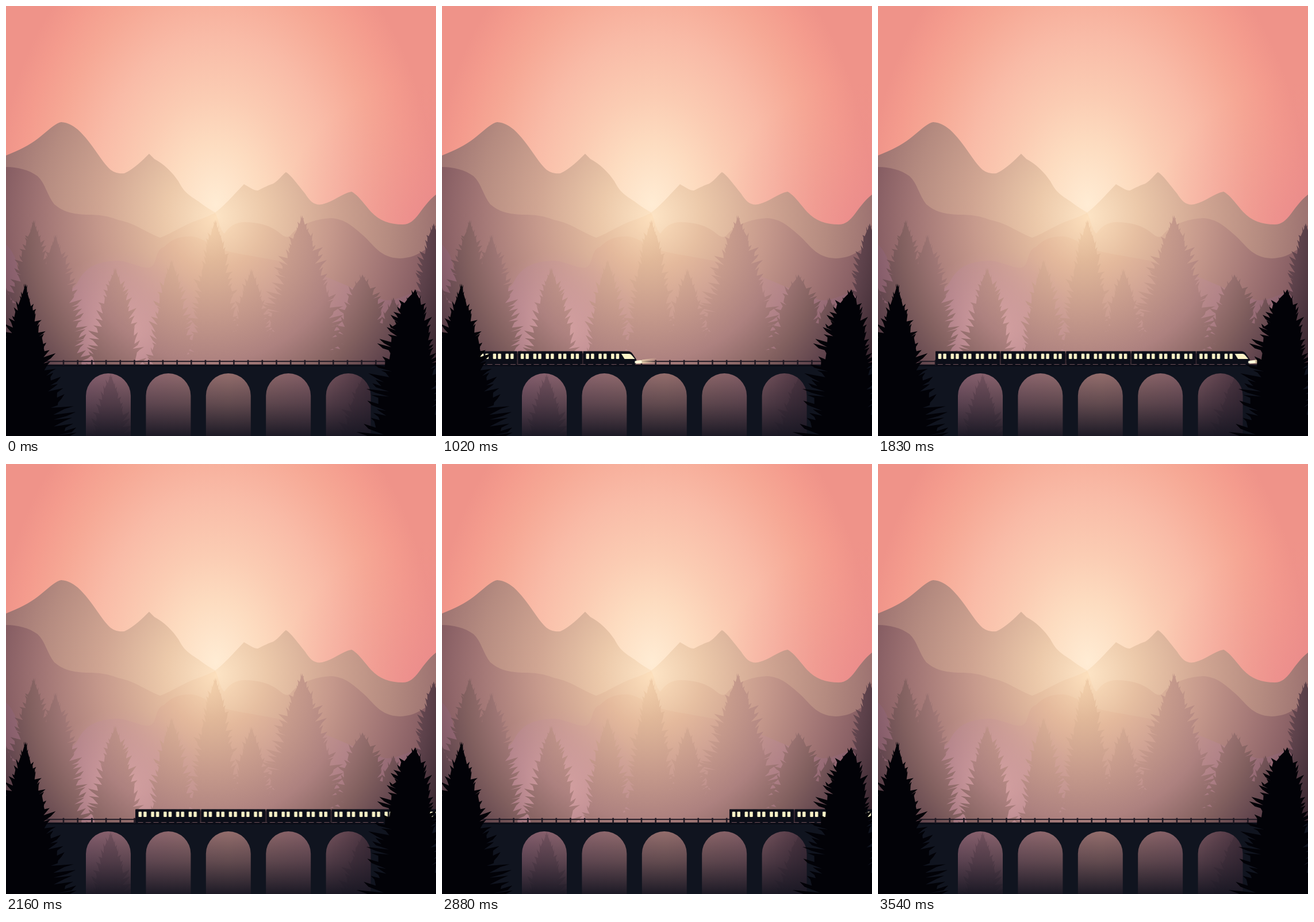
Animation, 748 px wide and 748 px high, one loop 4.38 s. Source, as an HTML page:

```html
<!DOCTYPE html>
<html lang="en">
<head>
<meta charset="utf-8">
<title>Evening train</title>
<style>
  html, body { margin: 0; width: 100%; height: 100%; overflow: hidden; background: #ef9389; }
  svg { display: block; width: 100vw; height: 100vh; }
  #train { animation: ride 4380ms steps(146) infinite; }
  @keyframes ride {
    from { transform: translateX(-597.5px); }
    to { transform: translateX(1071.3px); }
  }
</style>
</head>
<body>
<svg viewBox="0 0 748 748">
  <defs>
    <radialGradient id="sky" gradientUnits="userSpaceOnUse" cx="0" cy="0" r="1" gradientTransform="translate(365 345) scale(380 520)">
      <stop offset="0" stop-color="#ffecd4"/>
      <stop offset=".2" stop-color="#fddcc0"/>
      <stop offset=".36" stop-color="#fbccb3"/>
      <stop offset=".56" stop-color="#f9bba7"/>
      <stop offset=".76" stop-color="#f6a895"/>
      <stop offset=".9" stop-color="#f49b8d"/>
      <stop offset="1" stop-color="#ef9389"/>
    </radialGradient>
    <radialGradient id="blush" gradientUnits="userSpaceOnUse" cx="740" cy="400" r="270">
      <stop offset="0" stop-color="#e4828c" stop-opacity=".6"/>
      <stop offset="1" stop-color="#ec8c8c" stop-opacity="0"/>
    </radialGradient>
    <radialGradient id="far" gradientUnits="userSpaceOnUse" cx="365" cy="365" r="400">
      <stop offset="0" stop-color="#fde4c5"/>
      <stop offset=".22" stop-color="#ecc9aa"/>
      <stop offset=".5" stop-color="#d0a592"/>
      <stop offset=".76" stop-color="#b58b80"/>
      <stop offset="1" stop-color="#986e6e"/>
    </radialGradient>
    <radialGradient id="mid" gradientUnits="userSpaceOnUse" cx="365" cy="368" r="400">
      <stop offset="0" stop-color="#fde0bd"/>
      <stop offset=".22" stop-color="#e6bfa1"/>
      <stop offset=".5" stop-color="#c6998c"/>
      <stop offset=".75" stop-color="#a27675"/>
      <stop offset="1" stop-color="#7c545c"/>
    </radialGradient>
    <radialGradient id="near" gradientUnits="userSpaceOnUse" cx="365" cy="370" r="400">
      <stop offset="0" stop-color="#fbdcb6"/>
      <stop offset=".22" stop-color="#e4b99c"/>
      <stop offset=".45" stop-color="#c99b91"/>
      <stop offset=".68" stop-color="#b08187"/>
      <stop offset="1" stop-color="#7d5564"/>
    </radialGradient>
    <radialGradient id="mist" gradientUnits="userSpaceOnUse" cx="205" cy="565" r="140">
      <stop offset="0" stop-color="#dba6a6" stop-opacity=".85"/>
      <stop offset="1" stop-color="#cf9aa4" stop-opacity="0"/>
    </radialGradient>
    <radialGradient id="wood" gradientUnits="userSpaceOnUse" cx="355" cy="385" r="450">
      <stop offset="0" stop-color="#f3d0ab"/>
      <stop offset=".13" stop-color="#e1b899"/>
      <stop offset=".33" stop-color="#c79b8c"/>
      <stop offset=".52" stop-color="#ad817f"/>
      <stop offset=".7" stop-color="#82605f"/>
      <stop offset=".84" stop-color="#5f434c"/>
      <stop offset="1" stop-color="#38262f"/>
    </radialGradient>
    <linearGradient id="ground" gradientUnits="userSpaceOnUse" x1="139" x2="635" y1="0" y2="0">
      <stop offset="0" stop-color="#88606f"/>
      <stop offset=".5" stop-color="#97706e"/>
      <stop offset=".8" stop-color="#845e66"/>
      <stop offset="1" stop-color="#4a3340"/>
    </linearGradient>
    <linearGradient id="dusk" gradientUnits="userSpaceOnUse" x1="0" x2="0" y1="635" y2="748">
      <stop offset="0" stop-color="#191724" stop-opacity="0"/>
      <stop offset=".5" stop-color="#191724" stop-opacity=".42"/>
      <stop offset="1" stop-color="#171622" stop-opacity=".95"/>
    </linearGradient>
    <linearGradient id="beam">
      <stop offset="0" stop-color="#fff8d2"/>
      <stop offset=".35" stop-color="#f6e3b8" stop-opacity=".75"/>
      <stop offset="1" stop-color="#e6c3a0" stop-opacity=".1"/>
    </linearGradient>
  </defs>

  <rect width="748" height="748" fill="url(#sky)"/>
  <rect width="748" height="748" fill="url(#blush)"/>

  <path fill="url(#far)" d="M0 260C25 250 45 240 60 227C78 212 88 203 96 202C108 203 115 207 125 215C150 238 165 270 182 285C190 291 200 292 206 291C222 284 238 268 249 257L258 266C275 275 290 290 300 305C310 325 320 330 335 340C345 348 358 356 364 359C375 352 395 330 414 310L421 314C428 318 432 321 438 321C448 316 458 311 465 309C475 303 480 294 487 289C497 295 508 312 520 326C530 342 538 347 550 345C570 340 585 326 601 323C612 328 625 347 635 358C650 374 668 380 690 380C715 380 720 350 748 328V748H0Z"/>
  <path fill="url(#mid)" d="M0 280C20 280 40 285 55 296C68 308 72 330 84 345C100 358 115 362 140 363C165 363 175 365 195 372C225 378 240 392 268 403C290 395 310 380 335 372C350 367 358 362 364 360C370 370 372 390 380 396C388 384 398 376 415 376C440 376 460 382 475 394C484 402 490 404 495 399C505 385 530 371 565 369C590 370 605 385 620 398C640 415 650 438 685 439C715 438 725 425 748 412V748H0Z"/>
  <path fill="url(#near)" d="M0 415C8 422 14 432 18 445C22 475 40 500 70 500C100 500 115 498 125 480C140 450 165 444 195 443C215 444 235 457 250 455C264 450 258 424 275 419C290 404 305 400 325 401C345 404 360 420 380 425C400 432 470 440 500 450C560 470 620 500 660 512C690 512 720 490 748 480V748H0Z"/>
  <rect y="400" width="400" height="240" fill="url(#mist)"/>
  <g id="forest" fill="url(#wood)"></g>

  <rect y="625" width="748" height="123" fill="url(#ground)"/>
  <g id="under" fill="#2a1e2c" opacity=".2"></g>
  <rect y="625" width="748" height="123" fill="url(#dusk)"/>
  <path id="bridge" fill="#10141f" fill-rule="evenodd"/>
  <path fill="#0b0d17" d="M0 624H748V627H0Z"/>
  <g stroke="#211a24">
    <path d="M60 618.3H690" stroke-width="2"/>
    <path d="M60 623.3H690" stroke-width="1" stroke-opacity=".5"/>
    <path d="M98.7 620.2H690" stroke-width="9" stroke-dasharray="2.6 22.1"/>
  </g>

  <g id="train">
    <g id="cars"></g>
    <g transform="translate(454.4)">
      <path fill="#0c0e18" d="M0 600.5H78Q83 600.5 86 605L92 614Q94 618 92 622L90 624H0Z"/>
      <path fill="#fdf4c8" d="M66.5 605H80Q83 605 85 608L90 614H72Z"/>
      <path fill="url(#beam)" d="M92 617L127 612V621L92 622Z"/>
      <path fill="#fff9dc" d="M90 617.5L102 616.5V621L90 621.5Z"/>
    </g>
    <g id="windows" fill="#fdf4c8"></g>
    <path d="M4 623.5H540" stroke="#6d5058" stroke-width="1" stroke-dasharray="9 4.5"/>
  </g>

  <g id="front" fill="#020207"></g>
</svg>

<script>
  const NS = 'http://www.w3.org/2000/svg';
  const $ = id => document.getElementById(id);

  function add(id, tag, attrs) {
    const el = document.createElementNS(NS, tag);
    for (const key in attrs) el.setAttribute(key, attrs[key]);
    $(id).append(el);
  }

  let seed = 11;
  const rand = () => (seed = (seed * 16807) % 2147483647) / 2147483647;

  // One side of a conifer, from the thin leader to the base.
  function side(x, top, base, half, pow, dir) {
    const pts = [];
    let step = 6;
    for (let y = top + step; y < base; y += step) {
      const depth = y - top;
      const w = half * (depth / (base - top)) ** pow * (1 - Math.exp(-depth / 16));
      const out = Math.max(3, w * (0.78 + 0.42 * rand()));
      const inner = Math.max(1.2, w * (0.58 + 0.24 * rand()));
      const lift = 2 + 5 * rand();
      pts.push([x + dir * inner, y]);
      pts.push([x + dir * out, y - lift]);
      pts.push([x + dir * (inner + (out - inner) * 0.6), y + 2]);
      step = 6 + 7 * rand();
    }
    pts.push([x + dir * half, base]);
    return pts;
  }

  function tree(id, x, top, base, left, pow, right = left) {
    const pts = [[x, top],
      ...side(x, top, base, right, pow, 1),
      ...side(x, top, base, left, pow, -1).reverse()];
    add(id, 'path', { d: 'M' + pts.map(p => p.map(v => v.toFixed(1)).join(' ')).join('L') + 'Z' });
  }

  [
    [0, 490, 46, 0.5], [48, 372, 72, 0.7], [86, 398, 62, 0.62],
    [190, 455, 54, 0.62], [288, 441, 48, 0.6], [364, 372, 58, 0.6],
    [427, 457, 50, 0.6], [515, 364, 92, 0.72], [620, 467, 62, 0.45],
    [674, 507, 50, 0.5], [744, 378, 54, 0.55]
  ].forEach(([x, top, half, pow]) => tree('forest', x, top, 640, half, pow));

  tree('under', 182, 640, 760, 40, 0.6);
  tree('under', 622, 640, 760, 48, 0.6);

  let bridge = 'M0 625H748V748H0Z';
  for (let i = 0; i < 5; i++) bridge += `M${139 + 104.4 * i} 748V678a39 39 0 0 1 78 0V748Z`;
  $('bridge').setAttribute('d', bridge);

  const pitch = 113.6;
  for (let car = 0; car < 5; car++) {
    const x = car * pitch;
    if (car < 4) add('cars', 'rect', { x, y: 600.5, width: 112.6, height: 23.5, rx: 1, fill: '#0c0e18' });
    if (car) add('cars', 'rect', { x: x - 1.5, y: 604, width: 2, height: 19, fill: '#3a2c34' });
    for (let i = 0; i < (car < 4 ? 10 : 6); i++) {
      add('windows', 'rect', {
        x: x + 5 + 21.8 * (i >> 1) + 8.6 * (i % 2),
        y: 604.8, width: 5.5, height: 9.2, rx: 1.2
      });
    }
  }

  tree('front', 34, 483, 752, 110, 0.9, 88);
  tree('front', 712, 493, 752, 88, 0.42, 52);
</script>
</body>
</html>
```
